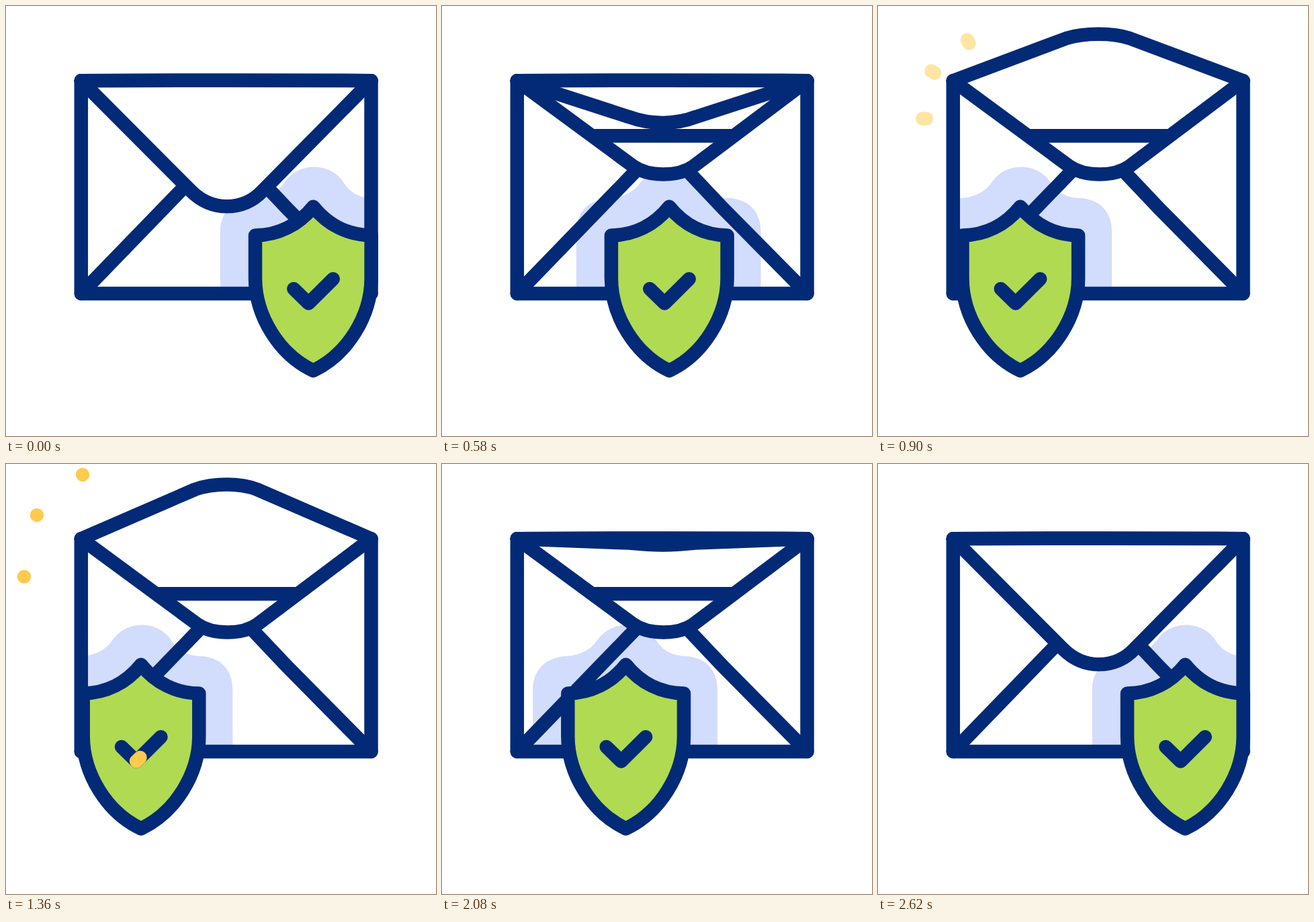
These frames come from a looping animation (640x640 px, 2820 ms). An HTML page without scripts:

```html
<!DOCTYPE html>
<html lang="en">
<head>
<meta charset="utf-8">
<title>Secure mail</title>
<style>
  html, body { margin: 0; width: 100%; height: 100%; overflow: hidden; background: #fff; }
  svg { display: block; width: 100vw; height: 100vh; }
  .line { fill: none; stroke: #032a77; stroke-width: 20.5; stroke-linecap: round; stroke-linejoin: round; }
  .flap { fill: #fff; }
  .body { fill: #b0da52; }
  .cloud { fill: #d2dcfc; }
  .spark { fill: none; stroke: #ffca4d; stroke-width: 20.3; stroke-linecap: round; stroke-linejoin: round; }
</style>
</head>
<body>
<svg viewBox="0 0 640 640">
  <defs>
    <clipPath id="inside"><path d="M112 111H543V428H112Z"/></clipPath>
    <path id="check" d="M-29 421L-7 442.5L29.5 406.3"/>
    <line id="ray" x1="0" x2="0.1" y1="0" y2="0">
      <animate attributeName="x2" dur="2.82s" repeatCount="indefinite" calcMode="spline"
        values="0.1;0.1;45.1;45.1" keyTimes="0;.2837;.4433;1"
        keySplines="0 0 1 1;.333 0 .667 1;0 0 1 1"/>
      <animate attributeName="x1" dur="2.82s" repeatCount="indefinite" calcMode="spline"
        values="0;0;45;45" keyTimes="0;.3191;.4539;1"
        keySplines="0 0 1 1;.333 0 .667 1;0 0 1 1"/>
    </line>
  </defs>

  <!-- soft shape behind the shield -->
  <g clip-path="url(#inside)">
    <g transform="translate(457.3 0)">
      <animateTransform attributeName="transform" type="translate" dur="2.82s" repeatCount="indefinite" calcMode="spline"
        values="457.3 0;457.3 0;201 0;201 0;457.3 0;457.3 0" keyTimes="0;.0709;.3546;.6383;.922;1"
        keySplines="0 0 1 1;.333 0 .667 1;0 0 1 1;.333 0 .667 1;0 0 1 1"/>
      <path class="cloud" d="M-138.5 428V336C-138.5 303 -115 287 -88 286C-68 285 -52 276 -43 263C-33 248 -17 239.5 2 239.5C20 239.5 37 249 46 264C55 278 70 285.5 88 286C115 287 136.3 303 136.3 336V428Z"/>
    </g>
  </g>

  <!-- envelope -->
  <g class="line">
    <path d="M111.8 111.3V428H543.5V111.3"/>
    <path d="M111.8 428L288 246M366 246L419 302L543.5 428"/>
    <path d="M228 193.3H430"/>
    <path d="M111.8 111.3L284 238C296 246.5 312 250.5 329.5 250.5C347 250.5 363 246.5 375 238L543.5 111.3"/>
    <path d="M111.8 111.3Q328 110 543.5 111.3">
      <animate attributeName="visibility" dur="2.82s" repeatCount="indefinite" calcMode="discrete"
        values="visible;hidden;visible" keyTimes="0;.251;.7305"/>
    </path>
  </g>
  <path class="line flap" d="M111.8 111.3L275 275C290 290 308 298.3 328.5 298.3C350 298.3 368 290 382 275L543.5 111.3">
    <animate attributeName="d" dur="2.82s" repeatCount="indefinite" calcMode="spline"
      values="M111.8 111.3L275 275C290 290 308 298.3 328.5 298.3C350 298.3 368 290 382 275L543.5 111.3;
              M111.8 111.3L275 275C290 290 308 298.3 328.5 298.3C350 298.3 368 290 382 275L543.5 111.3;
              M111.8 111.3L281 38C296 32.5 312 30.5 328.5 30.5C345 30.5 360 32.5 374 38L543.5 111.3;
              M111.8 111.3L281 38C296 32.5 312 30.5 328.5 30.5C345 30.5 360 32.5 374 38L543.5 111.3;
              M111.8 111.3L275 275C290 290 308 298.3 328.5 298.3C350 298.3 368 290 382 275L543.5 111.3;
              M111.8 111.3L275 275C290 290 308 298.3 328.5 298.3C350 298.3 368 290 382 275L543.5 111.3"
      keyTimes="0;.0709;.3546;.6277;.9113;1"
      keySplines="0 0 1 1;.333 0 .667 1;0 0 1 1;.333 0 .667 1;0 0 1 1"/>
  </path>
  <!-- keeps the top edge over the closed flap -->
  <path class="line" d="M111.8 111.3Q328 110 543.5 111.3">
    <animate attributeName="visibility" dur="2.82s" repeatCount="indefinite" calcMode="discrete"
      values="visible;hidden;visible" keyTimes="0;.251;.7305"/>
  </path>

  <!-- sparks -->
  <g class="spark" opacity="0">
    <animate attributeName="opacity" dur="2.82s" repeatCount="indefinite"
      values="0;0;1;1;0;0" keyTimes="0;.2837;.3546;.4965;.5674;1"/>
    <use href="#ray" transform="translate(72 167.7) rotate(180)"/>
    <use href="#ray" transform="translate(84.3 99.8) rotate(211.6)"/>
    <use href="#ray" transform="translate(135.6 55.5) rotate(241.4)"/>
  </g>

  <!-- shield -->
  <g transform="translate(457.3 0)">
    <animateTransform attributeName="transform" type="translate" dur="2.82s" repeatCount="indefinite" calcMode="spline"
      values="457.3 0;457.3 0;201 0;201 0;457.3 0;457.3 0" keyTimes="0;.0709;.3546;.6383;.922;1"
      keySplines="0 0 1 1;.333 0 .667 1;0 0 1 1;.333 0 .667 1;0 0 1 1"/>
    <path class="line body" d="M0 298.7C-22 326 -52 341 -86.3 341.5V405C-86.3 462 -50 519 0 542.7C50 519 86.3 462 86.3 405V341.5C52 341 22 326 0 298.7Z"/>
    <use class="line" href="#check"/>
    <use class="spark" href="#check" stroke-dasharray="8 200" opacity="0">
      <animate attributeName="stroke-dashoffset" dur="2.82s" repeatCount="indefinite" calcMode="spline"
        values="0;0;-74;-74" keyTimes="0;.4199;.5617;1"
        keySplines="0 0 1 1;.333 0 .667 1;0 0 1 1"/>
      <animate attributeName="opacity" dur="2.82s" repeatCount="indefinite"
        values="0;0;1;1;0;0" keyTimes="0;.4199;.4255;.5617;.5745;1"/>
    </use>
  </g>
</svg>
</body>
</html>
```
